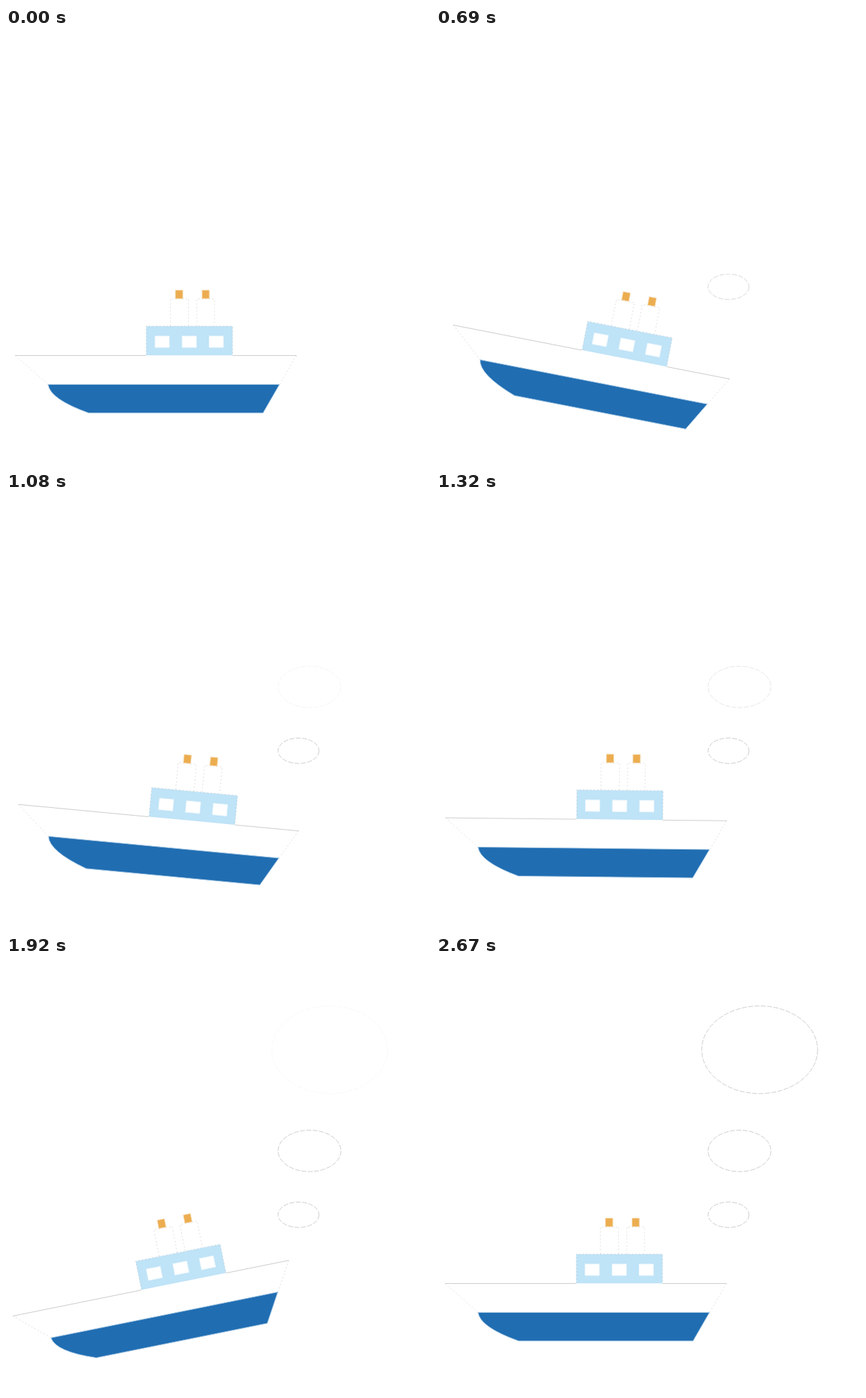
Animation, 600 px wide and 617 px high, one loop 2.7 s. Source, as an HTML page:

```html
<!DOCTYPE html>
<html lang="en">
<head>
<meta charset="utf-8">
<title>Rocking ship</title>
<style>
  html, body { margin: 0; width: 100%; height: 100%; overflow: hidden; background: #fff; }
  svg { display: block; width: 600px; height: 617px; }
  .line { fill: #fff; stroke: #777; stroke-width: .36; }
  .puff { stroke-dasharray: 7 2; }
  .faint { fill: none; stroke: #999; stroke-width: .3; stroke-dasharray: 2 3; }
  .window { fill: #fff; stroke: #eef8fd; }
  .cap { fill: #ecad50; stroke: #f7deb8; stroke-width: .8; }
  .hull { fill: #206db2; stroke: #a6c8e3; stroke-width: .9; }
</style>
</head>
<body>
<svg viewBox="0 0 600 617">
  <g class="line">
    <ellipse class="puff" cx="414" cy="366.2" rx="29" ry="18"/>
    <ellipse class="puff" cx="429.5" cy="275.8" rx="44.5" ry="29.3"/>
    <ellipse class="puff" cx="458" cy="132.7" rx="82" ry="62"/>
  </g>
  <g id="ship">
    <path class="faint" d="M232.5 421.5V383.5H258.5V421.5M270 421.5V383.5H295V421.5"/>
    <path class="cap" d="M239.8 371H250.2V383H239.8ZM277.4 371H287.8V383H277.4Z"/>
    <path fill="#bfe3f7" d="M198.5 422H320.5V463.3H198.5Z"/>
    <path class="faint" d="M198.5 463V421.7H320.5V463"/>
    <path class="window" d="M211 436H231V452H211ZM249.3 436H269.3V452H249.3ZM287.6 436H307.6V452H287.6Z"/>
    <path class="line" d="M13 463.5H198M320.5 463.5H411"/>
    <path class="faint" d="M13 463.5L59 504M411 463.5L387.5 504"/>
    <path class="hull" d="M59.6 504.4H387L363.7 544.8H117Q62 525 59.6 504.4Z"/>
  </g>
</svg>
<script>
  const FRAME_MS = 30, FRAMES = 90, FADE = 30;
  const tilt = [[0, 0], [25, 12], [65, -12], [89, 0]];
  const ship = document.getElementById('ship');
  const puffs = document.querySelectorAll('.puff');

  // Linear interpolation between [frame, value] keys.
  function at(keys, frame) {
    const next = keys.findIndex(key => key[0] > frame);
    if (next < 0) return keys[keys.length - 1][1];
    const [f0, v0] = keys[next - 1], [f1, v1] = keys[next];
    return v0 + (v1 - v0) * (frame - f0) / (f1 - f0);
  }

  function draw(now) {
    const frame = Math.floor(now / FRAME_MS) % FRAMES;
    ship.setAttribute('transform', `rotate(${at(tilt, frame)} 241.5 502)`);
    puffs.forEach((puff, i) => {
      puff.style.opacity = Math.max(0, Math.min(1, (frame - i * FADE) / (FADE - 1)));
    });
    requestAnimationFrame(() => draw(performance.now() - start));
  }

  const start = performance.now();
  draw(0);
</script>
</body>
</html>
```
